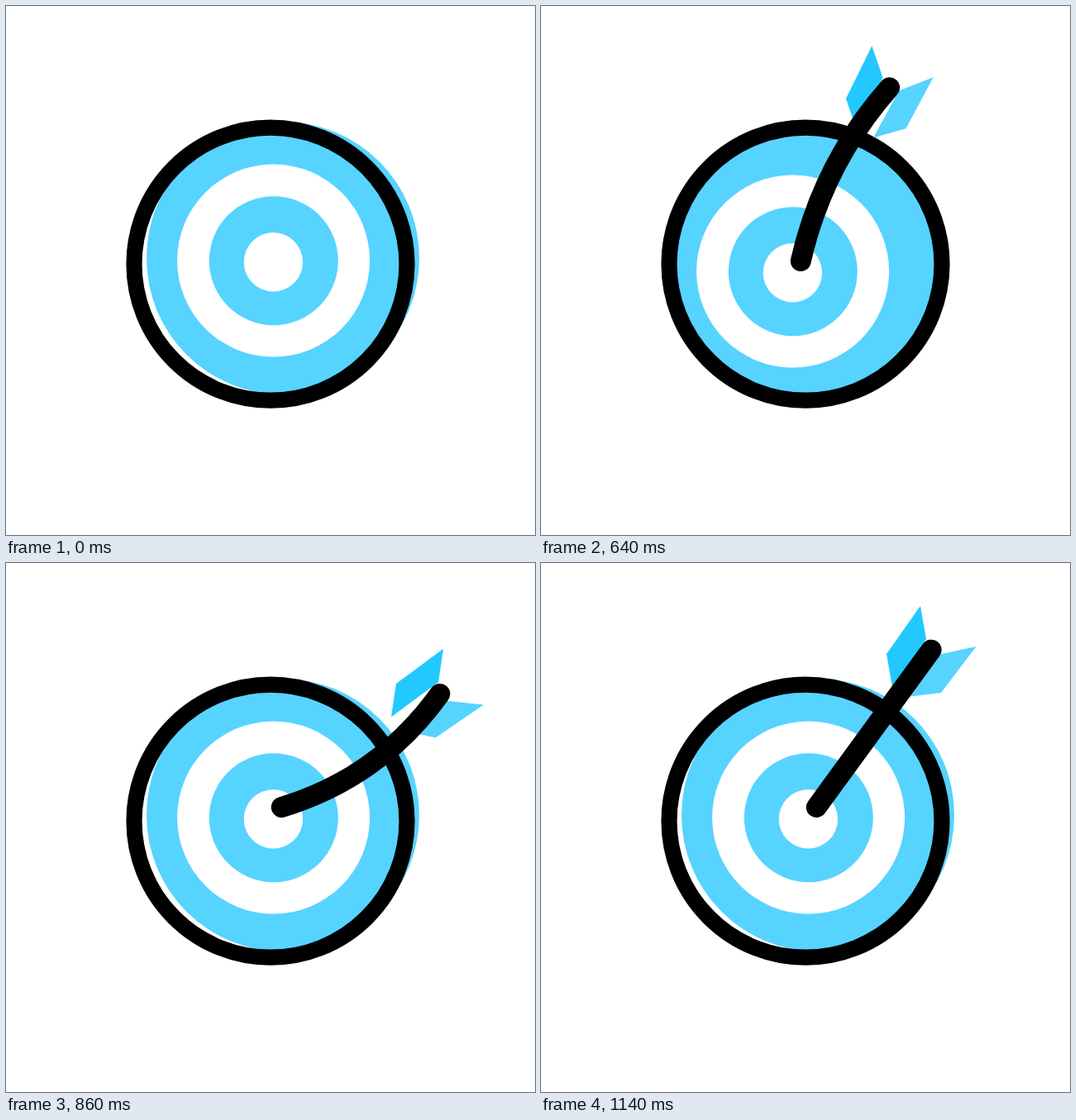
These frames come from a looping animation (640 px wide and 640 px high, 1.57 s). An HTML page:

```html
<!DOCTYPE html>
<html lang="en">
<head>
<meta charset="utf-8">
<title>Arrow and rings</title>
<style>
  html, body { margin: 0; width: 100%; height: 100%; overflow: hidden; background: #fff; }
  svg { display: block; width: 100%; height: 100%; }
</style>
</head>
<body>
<svg viewBox="0 0 640 640">
  <g id="disc">
    <circle cx="335" cy="305" r="165" fill="#57d3ff"/>
    <circle cx="323.6" cy="308" r="116.5" fill="#fff"/>
    <circle cx="323.8" cy="308.2" r="78" fill="#57d3ff"/>
    <circle cx="323.4" cy="309.8" r="35.7" fill="#fff"/>
  </g>
  <circle cx="320" cy="312.2" r="165" fill="none" stroke="#000" stroke-width="19.2"/>
  <!-- The arrow turns around the end that sticks in the disc. -->
  <g id="arrow">
    <path id="head" d="M-17-24 30 10-37 48.5Z" fill="#57d3ff"/>
    <path d="M125.7-243.5 84.7-185.5 91.7-145.5 132.7-203.5Z" fill="#23c8ff"/>
    <path d="M193.2-194.5 150.7-138.5 110-133.5 149.5-185Z" fill="#57d3ff"/>
    <path id="shaft" fill="none" stroke="#000" stroke-width="25" stroke-linecap="round"/>
  </g>
</svg>
<script>
const LOOP = 1570;
const ANCHOR = [333.3, 295.5];
const TAIL = [138.8, -190.3];
const FLIGHT = [156.7, -207.5];
const RECOIL = [-38, 26];

// start ms, distance left to fly, recoil, turn in degrees, bend in px, opacity
const POSES = [
  [0,    1,   0,   0,     0,  0],
  [430,  1,   0,   0,     0,  0.75],
  [500,  0.5, 0,   0,     0,  1],
  [570,  0,   0,   0,     0,  1],
  [640,  0,   0.5, -9,  -15,  1],
  [710,  0,   1,   -17.9, -31, 1],
  [790,  0,   0.5, 0,    -5,  1],
  [860,  0,   0,   18.3,  20, 1],
  [930,  0,   0,   5.9,   18, 1],
  [1000, 0,   0,   -3.4,  14, 1],
  [1070, 0,   0,   -7.6,   7, 1],
  [1140, 0,   0,   0,      0, 1]
];

const [disc, arrow, head, shaft] =
  ["disc", "arrow", "head", "shaft"].map(id => document.getElementById(id));

function shaftPath(bend) {
  const [x, y] = TAIL;
  const k = 2 * bend / Math.hypot(x, y);
  return `M0 0Q${x / 2 - y * k} ${y / 2 + x * k} ${x} ${y}`;
}

function draw(time) {
  const [, flight, recoil, turn, bend, opacity] = POSES.findLast(pose => pose[0] <= time);
  const shift = RECOIL.map(v => v * recoil);
  const place = ANCHOR.map((v, i) => v + shift[i] + FLIGHT[i] * flight);
  disc.setAttribute("transform", `translate(${shift})`);
  arrow.setAttribute("transform", `translate(${place}) rotate(${turn})`);
  arrow.setAttribute("visibility", opacity ? "visible" : "hidden");
  for (const part of arrow.children) part.setAttribute("opacity", opacity);
  head.setAttribute("display", flight ? "inline" : "none");
  shaft.setAttribute("d", shaftPath(bend));
}

const start = performance.now();
function tick() {
  draw((performance.now() - start) % LOOP);
  requestAnimationFrame(tick);
}
tick();
</script>
</body>
</html>
```
